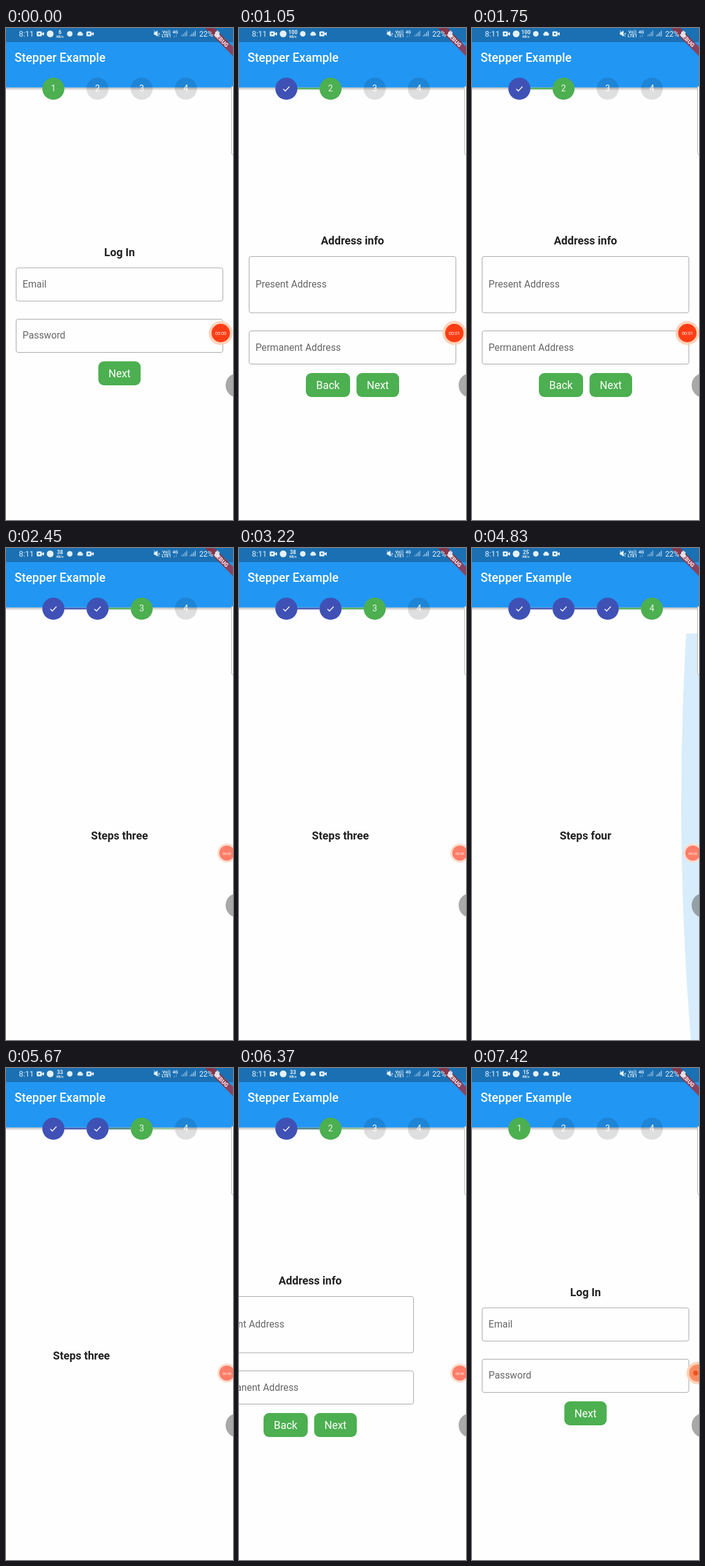
Recreate the animation shown at these times as an HTML page. Size 370 by 800 pixels, loop 7490 ms.

```html
<!DOCTYPE html>
<html lang="en">
<head>
<meta charset="utf-8">
<title>Stepper</title>
<style>
  html, body { margin: 0; width: 100%; height: 100%; overflow: hidden; background: #fefefe; }
  svg { display: block; width: 370px; height: 800px; font-family: Roboto, "Noto Sans", sans-serif; }
  .title { font-size: 18px; font-weight: 700; fill: #212121; text-anchor: middle; }
  .label { font-size: 15.8px; fill: #666; }
  .button { font-size: 17.5px; fill: #fff; text-anchor: middle; }
  .field { fill: none; stroke: #a6a6a6; }
  .mid { text-anchor: middle; }
  .status { fill: #e4f0fa; }
</style>
</head>
<body>
<svg id="stage" viewBox="0 0 370 800">
  <defs>
    <linearGradient id="shade" x2="0" y2="1">
      <stop stop-color="#000" stop-opacity=".27"/>
      <stop offset="1" stop-color="#000" stop-opacity="0"/>
    </linearGradient>
    <clipPath id="body"><rect y="139" width="370" height="661"/></clipPath>
    <g id="camera">
      <rect width="8.5" height="8" rx="1.5"/>
      <path d="M8 3.5 12 1V7L8 4.5Z"/>
      <circle cx="4.2" cy="4" r="1.4" fill="#1b70b3"/>
    </g>
    <path id="bars" d="M0 9V7H1.4V9ZM2.6 9V5H4V9ZM5.2 9V2.5H6.6V9ZM7.8 9V0H9.2V9Z"/>
  </defs>
  <rect width="370" height="800" fill="#fefefe"/>

  <g id="pages"></g>

  <g clip-path="url(#body)"><circle id="glow" cy="415" fill="#2ba0ea"/></g>

  <rect y="96.7" width="370" height="5" fill="url(#shade)"/>
  <rect width="370" height="96.7" fill="#2196f3"/>
  <rect width="370" height="23" fill="#1b70b3"/>
  <text x="14" y="55" font-size="19.6" font-weight="500" fill="#fff">Stepper Example</text>

  <g id="stepper"></g>

  <g transform="translate(370 0) rotate(45)">
    <rect x="-36" y="21.5" width="72" height="10.8" fill="#b71c1c" fill-opacity=".68"/>
    <text class="mid" y="30.2" font-size="9.2" font-weight="900" fill="#f3e3e8">DEBUG</text>
  </g>

  <g class="status">
    <text x="21" y="13.8" font-size="12.6">8:11</text>
    <use href="#camera" x="50" y="5.5"/>
    <circle cx="72" cy="9.5" r="5.5"/>
    <text id="speed" class="mid" x="88" y="9.5" font-size="8.6" font-weight="700"></text>
    <text class="mid" x="88" y="15.8" font-size="5.4" font-weight="700">KB/s</text>
    <circle cx="104" cy="9.5" r="4.5"/>
    <path d="M117.5 12.5a2.5 2.5 0 0 1 0-4.5a3.5 3.5 0 0 1 6.5 0a2.4 2.4 0 0 1 0 4.5Z"/>
    <use href="#camera" x="131" y="5.5"/>
    <path d="M241 7H243L247 4V14L243 11H241Z"/>
    <path d="M241 4 250 14M248 8 251 11M251 8 248 11" stroke="#e4f0fa" fill="none"/>
    <g class="mid" font-size="7" font-weight="700">
      <text x="261.5" y="9">Vo))</text>
      <text x="261.5" y="15.3">LTE1</text>
      <text x="276" y="9">4G</text>
      <text x="276" y="15.3">↓↑</text>
    </g>
    <use href="#bars" x="286" y="4.5" opacity=".6"/>
    <use href="#bars" x="300" y="4.5" opacity=".75"/>
    <text x="315" y="13.5" font-size="12.2">22%</text>
    <path d="M341 6h2V4.5h3V6h2v9h-7Z" opacity=".85"/>
  </g>

  <path d="M371 95H368.5Q367.5 95 367.5 98V203Q367.5 206.5 371 206.5" fill="#fff" stroke="#b5b5b5"/>
  <circle cx="378" cy="581" r="20" fill="#5a5a5a" fill-opacity=".52"/>

  <g id="recorder">
    <circle id="halo"/>
    <circle id="disc"/>
    <text id="clock" class="mid" fill="#fff"></text>
    <circle id="dot" r="4" cx="-3.5" fill="#f0501f"/>
  </g>
</svg>
<script>
const LOOP = 7490, TICK = 70, WIDTH = 370, SLIDE = 500, LINE_FADE = 220;
const GREEN = [76, 175, 80, 1], INDIGO = [63, 81, 181, 1], CLEAR = [76, 175, 80, 0];
const GREY = [0, 0, 0, .12];

// start time and direction of each page slide
const slides = [[400, 1], [1750, 1], [3150, 1], [5300, -1], [6008, -1], [6750, -1]];
const speeds = [[0, 6], [700, 100], [1900, 38], [3500, 25], [5500, 33], [7000, 15]];

const $ = id => document.getElementById(id);
const clamp = v => Math.min(1, Math.max(0, v));
const smooth = v => (v = clamp(v), v * v * (3 - 2 * v));
const lerp = (a, b, k) => a + (b - a) * k;
const rgba = c => `rgba(${c.join()})`;
const mix = (a, b, k) => rgba(a.map((v, i) => lerp(v, b[i], k)));

function set(el, attrs) {
  for (const name in attrs) el.setAttribute(name, attrs[name]);
}
function add(parent, tag, attrs, text = '') {
  const el = document.createElementNS('http://www.w3.org/2000/svg', tag);
  set(el, attrs);
  el.textContent = text;
  return parent.appendChild(el);
}
function keyed(keys, t) {
  const i = keys.findIndex(k => k[0] > t);
  if (i === 0) return keys[0][1];
  if (i < 0) return keys[keys.length - 1][1];
  const [a, b] = [keys[i - 1], keys[i]];
  return lerp(a[1], b[1], (t - a[0]) / (b[0] - a[0]));
}

function addPage(title, y) {
  const page = add($('pages'), 'g', {});
  add(page, 'text', { class: 'title', x: 185, y }, title);
  return page;
}
function addField(page, y, height, label, baseline) {
  add(page, 'rect', { class: 'field', x: 16.5, y: y + .5, width: 337, height, rx: 3.5 });
  add(page, 'text', { class: 'label', x: 27, y: baseline }, label);
}
function addButton(page, x, y, width, label) {
  add(page, 'rect', { x, y, width, height: 39, rx: 9, fill: rgba(GREEN) });
  add(page, 'text', { class: 'button', x: x + width / 2, y: y + 25.5 }, label);
}

const login = addPage('Log In', 371);
addField(login, 389.5, 54, 'Email', 421.5);
addField(login, 473, 54, 'Password', 505);
addButton(login, 150.5, 542, 69, 'Next');

const address = addPage('Address info', 352);
addField(address, 371, 91.5, 'Present Address', 421.5);
addField(address, 492, 54, 'Permanent Address', 524.5);
addButton(address, 109, 561, 72, 'Back');
addButton(address, 191.5, 561, 69.5, 'Next');

const pages = [login, address, addPage('Steps three', 474), addPage('Steps four', 474)];

const lines = [0, 1, 2].map(i =>
  add($('stepper'), 'rect', { x: 95 + 72 * i, y: 97, width: 36, height: 2.8, opacity: .88 }));
const steps = [0, 1, 2, 3].map(i => {
  const g = add($('stepper'), 'g', { transform: `translate(${77.2 + 72 * i} 98.7)` });
  return {
    disc: add(g, 'circle', { r: 18 }),
    number: add(g, 'text', { class: 'mid', y: 4.6, 'font-size': 14, fill: '#fff' }, i + 1),
    check: add(g, 'path', { d: 'M-5 .5 -1.7 3.8 5-3.5', fill: 'none', stroke: '#fff', 'stroke-width': 1.5 })
  };
});

const lineColor = (i, step) => i < step - 1 ? INDIGO : i === step - 1 ? GREEN : CLEAR;

function drawPages(t) {
  const position = slides.reduce((sum, [start, dir]) => sum + dir * smooth((t - start) / SLIDE), 0);
  pages.forEach((page, i) => set(page, { transform: `translate(${(i - position) * WIDTH} 0)` }));
}

function drawStepper(t) {
  let step = 0, before = 0, changed = -LOOP;
  for (const [start, dir] of slides) {
    const middle = start + SLIDE / 2;
    if (t < middle) break;
    before = step;
    step += dir;
    changed = middle;
  }
  const k = clamp((t - changed) / LINE_FADE);
  lines.forEach((line, i) => set(line, { fill: mix(lineColor(i, before), lineColor(i, step), k) }));
  steps.forEach(({ disc, number, check }, i) => {
    const done = i < step;
    set(disc, { fill: rgba(done ? INDIGO : i === step ? GREEN : GREY) });
    set(number, { opacity: done ? 0 : i === step ? .9 : 1 });
    set(check, { opacity: done ? 1 : 0 });
  });
}

function drawGlow(t) {
  const depth = keyed([[4100, 41], [4200, 39], [4830, 29], [5300, 15]], t);
  const radius = lerp(4700, 3700, (depth - 29) / 10);
  const opacity = keyed([[4080, 0], [4200, .035], [4500, .15], [4830, .175], [5300, 0]], t);
  set($('glow'), { cx: WIDTH - depth + radius, r: radius, opacity });
}

function drawRecorder(t) {
  const dock = smooth((t - 2050) / 280), stopped = t >= 7210;
  const x = stopped ? 368 : lerp(lerp(350, 351, clamp(t / 700)), 360, dock);
  set($('recorder'), { transform: `translate(${x} 496)` });
  set($('halo'), {
    r: stopped ? 18.5 : lerp(19.5, 15.7, dock),
    fill: mix([255, 207, 180, .9], [253, 218, 203, .9], stopped ? 0 : dock)
  });
  set($('disc'), {
    r: stopped ? 14 : lerp(15, 12.3, dock),
    fill: stopped ? '#ff8b5f' : mix([255, 61, 20, 1], [255, 125, 104, 1], dock)
  });
  set($('clock'), { y: 2.5, 'font-size': lerp(7.3, 5.6, dock), opacity: stopped ? 0 : 1 });
  $('clock').textContent = '00:0' + Math.floor((t + 200) / 1000);
  set($('dot'), { opacity: stopped ? 1 : 0 });
}

function draw(t) {
  drawPages(t);
  drawStepper(t);
  drawGlow(t);
  drawRecorder(t);
  $('speed').textContent = speeds.filter(([start]) => start <= t).pop()[1];
}

const began = performance.now();
function loop() {
  const t = (performance.now() - began) % LOOP;
  draw(Math.floor(t / TICK) * TICK);
  requestAnimationFrame(loop);
}
loop();
</script>
</body>
</html>
```
